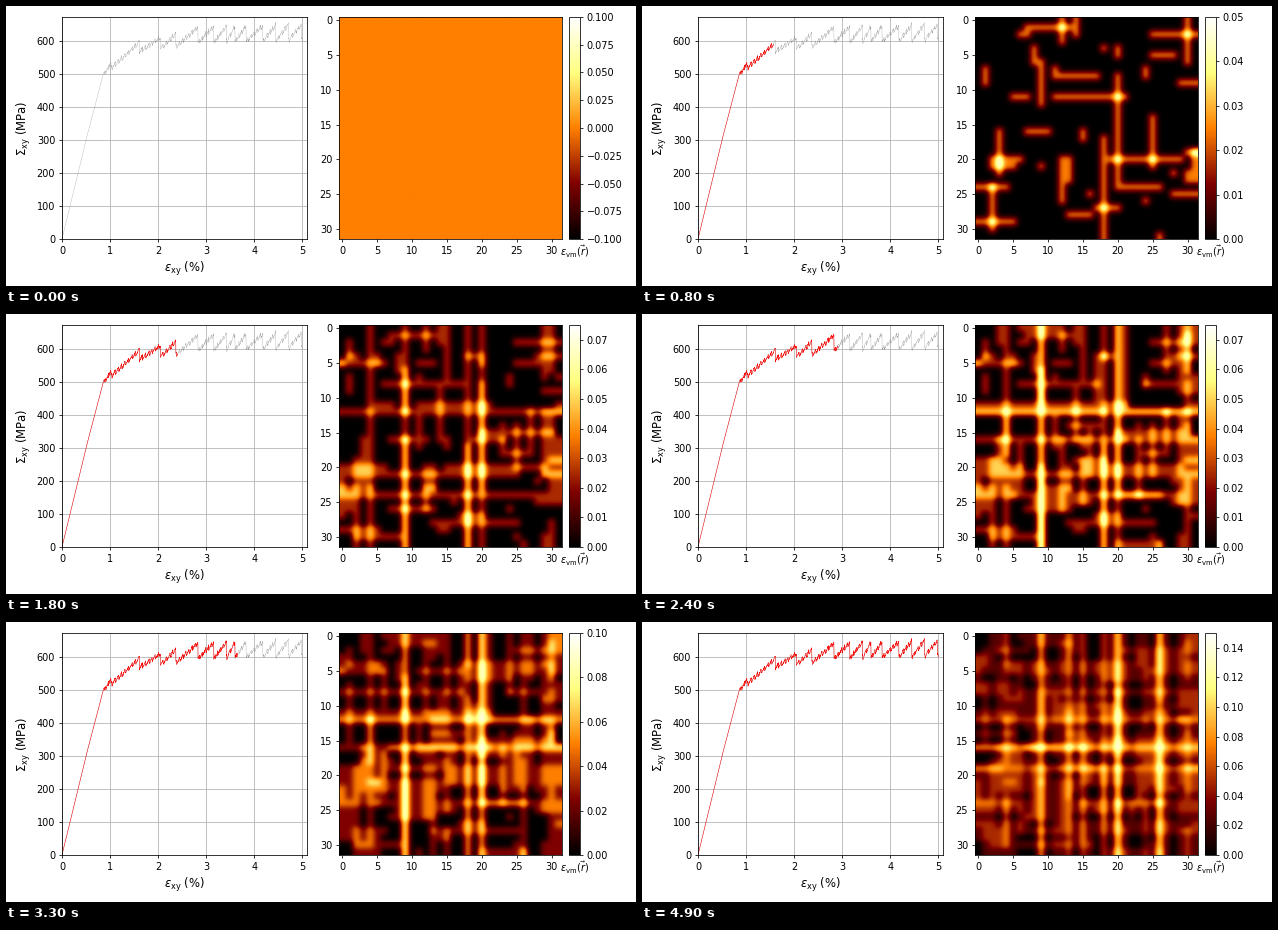
These frames come from a looping animation (630 px wide and 280 px high, 5 s). A matplotlib script:

```python
import matplotlib.pyplot as plt
import numpy as np
from matplotlib.animation import FuncAnimation

W, H, DPI = 630, 280, 70
FRAMES, INTERVAL = 50, 100
SIZE, UNIT = 32, 0.025

# Shear bands: line index -> (first frame, last frame, slips gained)
COL_BANDS = {4: (8, 24, 1.0), 9: (8, 24, 2.2), 13: (30, 49, 2.2),
             15: (26, 49, 1.4), 18: (2, 20, 1.2), 20: (8, 42, 3.2),
             26: (28, 49, 3.5), 30: (2, 36, 1.3)}
ROW_BANDS = {4: (8, 46, 0.8), 12: (8, 22, 1.5), 16: (16, 46, 2.4),
             19: (26, 49, 1.7), 21: (2, 24, 0.9), 24: (2, 20, 1.0)}
PEAK_STEPS = [1, 5, 10, 26, 35, 46]  # frames where the largest slip count rises


class SlipLines:
    """Parallel lines that slip piece by piece as their level grows."""

    def __init__(self, rng, bands):
        self.bands = bands
        self.rate = rng.uniform(0.2, 1.8, SIZE) * 0.55 / (FRAMES - 1)
        self.phase = np.array([
            np.repeat(rng.random(SIZE), rng.integers(1, 9, SIZE))[:SIZE]
            for _ in range(SIZE)])

    def counts(self, frame):
        level = self.rate * frame
        for line, (start, end, gain) in self.bands.items():
            level[line] += np.interp(frame, [start, end], [0, gain])
        return np.floor(level[:, None] + self.phase)


def stress_curve():
    rng = np.random.default_rng(3)
    strain = np.linspace(0, 5, 1500)
    mean = np.interp(strain, [0, .5, .87, 1.1, 1.6, 2.2, 2.8, 5],
                     [0, 300, 505, 535, 582, 597, 618, 625])
    # large load drops, then fine serrations once yielding has begun
    drops = np.array([.88, 1.02, 1.61, 2.05, 2.37, 2.83, 3.16, 3.42, 3.6,
                      3.83, 4.18, 4.45, 4.71, 4.98, 5.3])
    ramp = np.interp(strain, drops, np.arange(drops.size)) % 1 - .5
    teeth = np.cumsum(rng.uniform(0, .1, strain.size)) % 1 - .5
    yielded = strain > drops[0]
    swing = np.interp(strain, [.9, 2.8], [15, 48])
    noise = swing * ramp + 14 * teeth + rng.normal(0, 1.5, strain.size)
    return strain, mean + yielded * noise


def add_axes(x, width):
    return fig.add_axes([x / W, 47 / H, width / W, 222 / H])


plt.rcParams["font.family"] = "DejaVu Sans"
fig = plt.figure(figsize=(W / DPI, H / DPI), dpi=DPI, facecolor="white")
rng = np.random.default_rng(11)
rows, cols = SlipLines(rng, ROW_BANDS), SlipLines(rng, COL_BANDS)
strain, stress = stress_curve()

ax = add_axes(56, 245)
ax.plot(strain, stress, color="gray", lw=0.25)
loaded, = ax.plot([], [], color="red", lw=0.5)
ax.set(xlim=(0, 5.1), ylim=(0, 672))
ax.set_xlabel(r"$\varepsilon_{\mathrm{xy}}$ (%)", fontsize=12)
ax.set_ylabel(r"$\Sigma_{\mathrm{xy}}$ (MPa)", fontsize=12)
ax.grid(True)

map_ax = add_axes(333, 223)
image = map_ax.imshow(np.zeros((SIZE, SIZE)), cmap="afmhot", vmin=-0.1,
                      vmax=0.1, interpolation="gaussian", aspect="auto")
bar_ax = add_axes(563, 11)
fig.colorbar(image, cax=bar_ax)
bar_ax.set_xlabel(r"$\varepsilon_{\mathrm{vm}}(\vec{r})$", fontsize=10)


def update(frame):
    reached = np.interp(frame, [0, 1, 8, 49], [0, .92, 1.57, 5])
    shown = strain <= reached
    loaded.set_data(strain[shown], stress[shown])
    peak = np.searchsorted(PEAK_STEPS, frame, side="right")
    slips = rows.counts(frame) + cols.counts(frame).T
    image.set_data(UNIT * np.minimum(slips, peak))
    if peak:
        image.set_clim(0, UNIT * peak)
    else:
        image.set_clim(-0.1, 0.1)
    return loaded, image


anim = FuncAnimation(fig, update, frames=FRAMES, interval=INTERVAL,
                     repeat=True, repeat_delay=0, blit=False)
plt.show()
```
